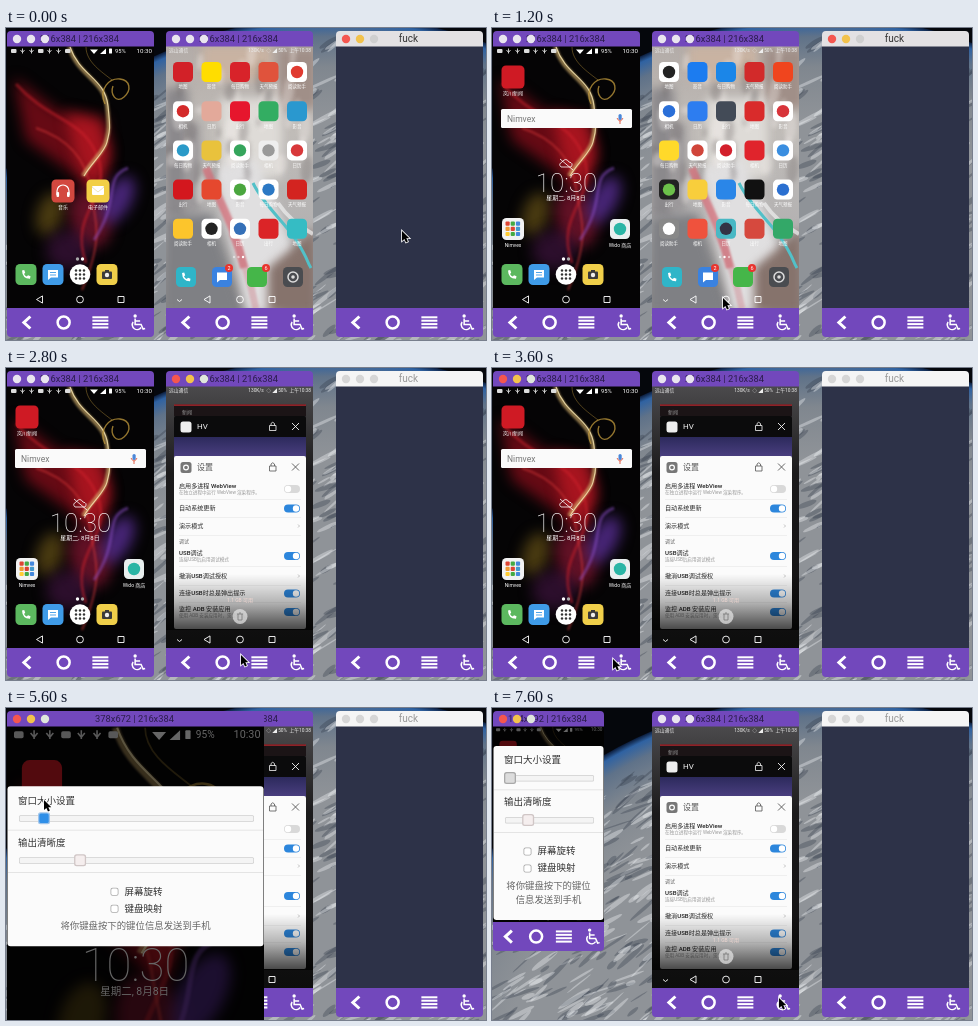
An HTML page with a canvas for the animation above (8000 ms loop, 480 px wide and 312 px high).

```html
<!DOCTYPE html>
<html lang="zh">
<head>
<meta charset="utf-8">
<style>
html, body { margin: 0; width: 100%; height: 100%; overflow: hidden; background: #000; }
canvas { display: block; width: 480px; height: 312px; }
</style>
</head>
<body>
<canvas></canvas>
<script>
const canvas = document.querySelector('canvas'), g = canvas.getContext('2d');
const dpr = window.devicePixelRatio || 1;
canvas.width = 480 * dpr;
canvas.height = 312 * dpr;

const PURPLE = '#7248bc', STEP = 400, STEPS = 20;

// drawing helpers
function rect(x, y, w, h, col, r = 0) {
  g.fillStyle = col;
  g.beginPath();
  g.roundRect(x, y, w, h, r);
  g.fill();
}
function oval(x, y, rx, ry, turn, col) {
  g.fillStyle = col;
  g.beginPath();
  g.ellipse(x, y, rx, ry, turn, 0, 7);
  g.fill();
}
const disc = (x, y, r, col) => oval(x, y, r, r, 0, col);
function ring(x, y, r, col, w) {
  g.strokeStyle = col;
  g.lineWidth = w;
  g.beginPath();
  g.arc(x, y, r, 0, 7);
  g.stroke();
}
function line(d, col, w = 1) {
  g.strokeStyle = col;
  g.lineWidth = w;
  g.stroke(new Path2D(d));
}
function shape(d, col) {
  g.fillStyle = col;
  g.fill(new Path2D(d));
}
function text(s, x, y, size, col, align = 'left', weight = 400) {
  g.font = `${weight} ${size}px Roboto, "Noto Sans CJK SC", "Noto Sans CJK", sans-serif`;
  g.textAlign = align;
  g.textBaseline = 'middle';
  g.fillStyle = col;
  g.fillText(s, x, y);
}
function fade(y0, y1, ...cols) {
  const f = g.createLinearGradient(0, y0, 0, y1);
  cols.forEach((c, i) => f.addColorStop(i / (cols.length - 1), c));
  return f;
}
function at(x, y, draw) {
  g.save();
  g.translate(x, y);
  draw();
  g.restore();
}
function blurred(px, draw) {
  g.save();
  g.filter = `blur(${px * dpr}px)`;
  draw();
  g.restore();
}
function random(seed) {
  return () => (seed = seed * 16807 % 2147483647) / 2147483647;
}

// planet seen from space
function desktop() {
  rect(0, 0, 480, 312, '#05070c');
  g.save();
  const earth = g.createRadialGradient(330, 420, 330, 330, 420, 432);
  [[0, '#8f9398'], [.5, '#80878f'], [.8, '#5f7289'], [.94, '#2f62a2'], [1, '#0a1a38']]
    .forEach(s => earth.addColorStop(...s));
  g.fillStyle = earth;
  g.beginPath();
  g.arc(330, 420, 432, 0, 7);
  g.fill();
  g.clip();
  const rnd = random(11);
  for (let i = 0; i < 900; i++) {
    const x = rnd() * 480, y = rnd() * 320, light = rnd() < .55;
    if (Math.hypot(x - 330, y - 420) > 408) continue;
    oval(x, y, 5 + rnd() * 15, .6 + rnd() * 2.2, rnd() * .5 - .8,
      light ? 'rgba(240,242,244,.38)' : 'rgba(52,60,74,.34)');
  }
  g.restore();
}

const toolIcons = [
  () => line('M3.5-6L-3 0 3.5 6', '#fff', 3),
  () => ring(0, 0, 6, '#fff', 2.5),
  () => [-5.2, -1.8, 1.6, 5].forEach(y => rect(-8, y - 1, 16, 2, '#fff')),
  () => {
    disc(-2, -6.5, 1.7, '#fff');
    line('M-2-4V2H4L6 6.5 8 6M-2-1.5H3', '#fff', 1.5);
    line('M-4-.5A4.6 4.6 0 1 0 4 5', '#fff', 1.5);
  }
];

function chrome(x, w, h, title, active, plain) {
  const idle = plain ? '#d6d6d6' : '#e9e5ef';
  const lights = ['#f4564f', '#f2c24c', plain ? '#cfcfcf' : '#dfe6dc'];
  rect(x, 3, w, 15.5, plain ? (active ? '#e3e1e3' : '#f5f5f5') : PURPLE, [4, 4, 0, 0]);
  text(title, x + w / 2 - 1, 11, plain ? 10 : 9.3, plain ? (active ? '#333' : '#999') : '#2a1c4a', 'center');
  [10, 24, 38].forEach((dx, i) => disc(x + dx, 11, 4.2, active ? lights[i] : idle));
  rect(x, 18 + h, w, 29, PURPLE, [0, 0, 4, 4]);
  toolIcons.forEach((icon, i) => at(x + w / 8 + 1.5 + i * w / 4, 32.5 + h, icon));
}

// phone parts
const words = ['影音', '阅读助手', '出行', '每日购物', '相机', '地图', '天气预报', '日历'];
function icon(x, y, spec, size = 20) {
  const [bg, dot] = spec.split('/');
  rect(x - size / 2, y - size / 2, size, size, '#' + bg, 4.5);
  if (dot) disc(x, y, size * .31, '#' + dot);
}
function grid(list, y0) {
  list.split(' ').forEach((spec, i) => {
    const x = 177 + i % 5 * 28.5, y = y0 + Math.floor(i / 5) * 39.2;
    icon(x, y, spec);
    text(words[(i * 3 + list.length) % 8], x, y + 15, 4.5, '#fff', 'center');
  });
}
function nav(xs) {
  const [a, b, c] = xs;
  at(a, 271.5, () => line('M3-3.6V3.6L-3 0Z', '#fff', .9));
  ring(b, 271.5, 3.4, '#fff', .9);
  at(c, 271.5, () => line('M-3-3H3V3H-3Z', '#fff', .9));
}
const handset = 'M-4-4L-1.8-4.4-.8-1.8-2-.6Q-.8 1.4.8 2L2 .8 4.5 1.8 4 4.2Q-3.6 4.4-4-4Z';
const bubble = 'M-5-4.5H5V3H-2L-5 5.5Z';

function camera(x, y) {
  rect(x - 5, y - 3.5, 10, 7.5, '#3a3a3a', 1);
  rect(x - 2, y - 5, 4, 2, '#3a3a3a');
  disc(x, y, 2.2, '#eee');
}

// left phone
function smoke() {
  rect(1, 18, 147, 263, '#050405');
  blurred(7, () => {
    shape('M8 50L50 82 88 92 104 120 92 170 60 140 20 112Z', 'rgba(120,12,24,.85)');
    shape('M60 85L98 90 104 130 88 165 70 130Z', 'rgba(190,25,35,.75)');
    oval(44, 186, 13, 22, .3, 'rgba(98,78,22,.75)');
    oval(84, 190, 20, 30, -.3, 'rgba(130,22,48,.75)');
    oval(112, 172, 13, 26, .5, 'rgba(84,44,140,.85)');
    oval(62, 222, 22, 20, 0, 'rgba(70,22,70,.6)');
  });
  blurred(1, () => {
    line('M10 56C45 95 78 90 92 130S62 185 80 235', 'rgba(205,35,45,.5)', 3);
    line('M30 100C60 110 80 130 84 160S100 205 76 262', 'rgba(225,60,60,.5)', 2);
    line('M122 140C96 150 116 170 88 212', 'rgba(140,80,200,.5)', 3);
    line('M63 19C72 48 98 52 101 78S102 104 100 114 84 134 77 148', 'rgba(214,178,110,.65)', 4);
  });
  line('M64 19C74 48 99 50 102 78S103 104 101 114 86 134 78 148', 'rgba(246,228,176,.85)', 1.2);
  line('M99 76C92 60 104 50 114 51S126 62 118 69 104 66 107 58', 'rgba(196,156,62,.75)', 1.4);
  line('M80 19C80 34 96 44 106 52', 'rgba(196,156,62,.4)', 1);
}
function homeOne() {
  icon(21, 49, 'cf1a24', 23);
  text('岚川新闻', 21, 66, 5, '#fff', 'center');
  rect(9, 81, 131, 19, '#fafafa', 1.5);
  text('Nimvex', 15, 91, 8.5, '#777');
  rect(126.5, 86, 3.2, 6, '#4a86d8', 1.6);
  line('M125 90Q128 96 131 90M128 93V96', '#e0543c', .9);
  line('M69 139H79Q82 135 77 134 74 129 70 134 66 136 69 139ZM68 131L81 142', '#fff', .8);
  text('10:30', 74.5, 156, 26, '#fff', 'center', 100);
  text('星期二, 8月8日', 74, 170, 6, '#fff', 'center');
  icon(21, 201, 'f2f2f2', 22);
  ['#d43', '#4a4', '#48d', '#e93', '#d43', '#49c', '#fc3', '#4a4', '#48d'].forEach((c, i) =>
    rect(13.5 + i % 3 * 5.2, 193.5 + Math.floor(i / 3) * 5.2, 4.2, 4.2, c, 1));
  text('Nimvex', 21, 218, 5, '#fff', 'center');
  icon(128, 201, 'e9efef/2ab5a5', 20);
  text('Wido 商店', 128, 218, 5, '#fff', 'center');
}
function homeTwo() {
  icon(57, 163, 'd3483f', 23);
  line('M51 167V163A6 6 0 0 1 63 163V167', '#fff', 1.2);
  rect(50.5, 164, 2.6, 5, '#fff', 1);
  rect(61, 164, 2.6, 5, '#fff', 1);
  text('音乐', 57, 180, 5, '#fff', 'center');
  icon(92, 163, 'f2cf45', 23);
  rect(86, 158, 12, 9, '#fff', 1);
  line('M86 159L92 164 98 159', '#e9d9a0', .7);
  text('电子邮件', 92, 180, 5, '#fff', 'center');
}
function leftScreen(p) {
  smoke();
  at(p * 147, 0, homeTwo);
  at((p - 1) * 147, 0, homeOne);
  for (let i = 0; i < 7; i++) {
    if (i % 3 == 0) rect(5 + i * 9, 21, 5.5, 4, '#ddd', 1);
    else at(7.5 + i * 9, 23, () => line('M0-2.5V2.5M-2-1L0 1.5 2-1', '#ddd', .9));
  }
  shape('M84 21.5H92L88 26ZM100 20.5V26H94Z', '#fff');
  rect(103, 20.5, 3, 5, '#fff', .5);
  text('95%', 109, 23.2, 5.8, '#fff');
  text('10:30', 146, 23.2, 6.2, '#fff', 'right');
  disc(71.5, 231, 1.7, p < .5 ? '#aaa' : '#fff');
  disc(76.5, 231, 1.7, p < .5 ? '#fff' : '#aaa');
  icon(20, 246.5, '5cb85f', 21);
  at(20, 246.5, () => shape(handset, '#fff'));
  icon(47, 246.5, '3f9be8', 21);
  at(47, 246.5, () => shape(bubble, '#fff'));
  line('M44 244.5H50M44 247H50', '#3f9be8', .9);
  disc(74, 246.5, 10.3, '#fff');
  for (let i = 0; i < 9; i++) disc(70 + i % 3 * 4, 242.5 + Math.floor(i / 3) * 4, 1.2, '#333');
  icon(101, 246.5, 'f0cf4a', 21);
  camera(101, 247);
  nav([33.5, 74, 115]);
}

// middle phone
const pageA = 'd22128 fd0 d8232a e0533c fff/e03a30 fff/d42a2a e3a99a e6162d 33ad62 2a98cf fff/2a9ac8 e9c23c fff/35a55c eee/999 fff/d8383a ' +
  'd3171e e5482e fff/4aa63e fff/2b78c4 d32420 fcc52c fff/222 fff/3570b8 db2427 35bcc4';
const pageB = 'fff/222 1c7cf0 1b86e8 d22a2a f0451e fff/2a6fd8 2d7df0 434b57 d92b2b fff/d8343a ffd92a fff/d0453a fff/d3202c e0242c fff/3a8ee0 ' +
  '222/6cc04a f8ce3c 2a86e8 111 fff/2a6fd0 888/fff ef523d 48b8c4/334 d6493e 33a868';

function street() {
  rect(160, 18, 148, 263, fade(18, 281, '#b3aca8', '#c0bcb8', '#b4b2b2', '#8d8887'));
  blurred(5, () => {
    rect(158, 60, 24, 130, '#8b898c');
    rect(196, 18, 70, 34, '#c9b3a2');
    rect(272, 20, 40, 60, '#a08f88');
    rect(180, 95, 14, 90, '#9a9799');
    rect(214, 70, 62, 80, '#dedbd7');
    shape('M158 190L205 185 238 285H158Z', '#7f8084');
    shape('M208 140L250 130 296 240 270 285H240Z', '#e0dfe0');
    shape('M262 240L310 200V285H262Z', '#86736c');
  });
  const rnd = random(5);
  blurred(2, () => {
    for (let i = 0; i < 45; i++)
      oval(160 + rnd() * 148, 25 + rnd() * 150, 2 + rnd() * 5, 4 + rnd() * 13, .1,
        rnd() < .5 ? 'rgba(245,242,238,.35)' : 'rgba(105,98,98,.3)');
  });
  blurred(1, () => {
    line('M200 140C212 172 228 195 238 240', 'rgba(212,110,120,.75)', 8);
    line('M226 205C236 228 244 250 250 281', 'rgba(200,120,130,.4)', 7);
  });
  line('M247 155C258 178 280 195 292 215S300 232 305 240', '#52c0c8', 3);
  line('M272 175C282 190 296 200 307 206', 'rgba(240,240,240,.7)', 4);
}
function homeC() {
  text('10:30', 194, 43, 22.5, '#fff', 'center', 100);
  text('8月8日 星期二', 168, 62, 5.5, '#fff');
  shape('M265 48H279Q282 43 277 42 274 35 269 40 263 41 265 48Z', '#fff');
  text('32°', 281, 43, 10.5, '#fff', 'left', 300);
  text('多云 良', 283, 60, 5, '#fff');
  grid('ddd/222 fff/2a7cc0 ddd/222 f2f2f2/4a86c8 d9322c f0b04a 3c86e4 5a4fa8 f4f4f4 df3a34', 84);
  text('8', 291, 86, 11, '#fff', 'center');
  disc(177, 119, 3.4, '#fff');
  rect(171, 123.5, 12, 5, '#fff', 2.5);
  shape('M205.5 128L200 122Q201 117 205.5 120 210 117 211 122Z', '#fff');
  ring(234, 122.5, 5, '#fff', 1.2);
  line('M234 119V123H237', '#fff', 1);
  for (let i = 0; i < 9; i++) rect(255.5 + i % 3 * 5, 116 + Math.floor(i / 3) * 5, 4, 4, i % 2 ? '#d9534a' : '#4c8fd0', 1);
  rect(167, 151, 20, 20, 'rgba(140,140,140,.55)', 4.5);
  line('M170 156H175M172.5 153.5V158.5M179 156H184M170 165H175M179 164H184M179 167H184', '#fff', .9);
  text('计算器', 177, 177, 4.8, '#fff', 'center');
}
function toggle(y, on) {
  rect(278, y - 4, 16, 8, on ? '#2c86dc' : '#d9d9d9', 4);
  disc(on ? 290 : 282, y, 3.2, '#fff');
}
function cardTop(y, name, col, tile) {
  rect(174.5, y - 5, 11, 11, tile, 2.5);
  text(name, 191, y + .5, 8, col);
  line(`M263.5 ${y - 1}h6.5v5h-6.5zM265 ${y - 1}v-2q1.7-2.5 3.5 0v2`, col, .8);
  line(`M286 ${y - 3.5}l7 7m0-7l-7 7`, col, .9);
}
function recents() {
  rect(160, 18, 148, 263, fade(18, 281, '#4b4a4c', '#1b1a1b', '#161516', '#0d0d0d'));
  rect(168, 36.5, 132, 12, '#1b1416', 1);
  rect(168, 36.5, 132, 1.3, '#b5262c');
  text('新闻', 176, 45, 5, '#999');
  rect(168, 48, 132, 40, '#0b0b0c', 2);
  rect(168, 69, 132, 20, fade(69, 89, '#2c2a5c', '#4a3f80'));
  rect(168, 88, 132, 173, '#fbfbfb', 2);
  cardTop(58.5, 'HV', '#f5f5f5', '#eee');
  cardTop(99, '设置', '#555', '#777');
  ring(180, 99.5, 2.4, '#fff', 1.2);
  const rows = [
    [118, '启用多进程 WebView', 121, 0, '在独立进程中运行 WebView 渲染程序。'],
    [140.5, '自动系统更新', 140.5, 1],
    [158, '演示模式'],
    [185, 'USB调试', 188, 1, '连接USB后启用调试模式'],
    [208, '撤消USB调试授权'],
    [225.5, '连接USB时总是弹出提示', 225.5, 1],
    [241, '监控 ADB 安装应用', 244, 1, '使用 ADB 安装应用时，需要确认']
  ];
  rows.forEach(([y, name, ty, on, sub]) => {
    text(name, 173, y, 6.1, '#222', 'left', 500);
    if (sub) text(sub, 173, y + 7, 4.6, '#999');
    if (ty) toggle(ty, on);
    else line(`M292 ${y - 1.5}l1.5 1.5-1.5 1.5`, '#aaa', .7);
  });
  text('调试', 173, 173.5, 5, '#666');
  [131, 149.5, 167, 198, 217, 234].forEach(y => rect(173, y, 122, .4, '#e4e4e4'));
  rect(160, 206, 148, 56, fade(206, 262, 'rgba(0,0,0,0)', 'rgba(0,0,0,.28)', 'rgba(0,0,0,.72)'));
  text('1.1 GB 可用', 234, 233, 5, '#f0d6d0', 'center');
  disc(234, 248.5, 7.5, 'rgba(225,225,225,.75)');
  line('M231 246H237M232 246V252H236V246M233 245H235', '#777', .8);
}
function middleScreen(p, k) {
  if (k >= 6) recents();
  else {
    street();
    if (k >= 4) homeC();
    else {
      at(p * 147, 0, () => grid(pageA, 44));
      at((p - 1) * 147, 0, () => grid(pageB, 44));
    }
    const on = k >= 4 ? 0 : p < .5 ? 2 : 1;
    [0, 1, 2].forEach(i => disc(228 + i * 4.5, 229, 1.2, i == on ? '#fff' : 'rgba(255,255,255,.5)'));
    icon(180, 249, '2fb5c8', 20);
    at(180, 249, () => shape(handset, '#fff'));
    icon(216, 249, '3a82e0', 20);
    at(216, 249, () => shape(bubble, '#fff'));
    icon(251, 249, '45b649', 20);
    icon(287, 249, '4a4c50', 20);
    ring(287, 249, 5, '#ddd', 1.5);
    disc(287, 249, 1.8, '#ddd');
    [[223, '2'], [260, '6']].forEach(([x, n]) => {
      disc(x, 240, 4, '#e8342e');
      text(n, x, 240.3, 5.5, '#fff', 'center');
    });
  }
  text('远山通信', 163, 23, 4.8, '#eee');
  text('130K/s  ◇ ◢ 50%  上午10:38', 305, 23, 4.8, '#eee', 'right');
  line('M171 271.5l2.5 2 2.5-2', '#fff', .9);
  nav([201, 234, 266]);
}

// settings dialog
function slider(x, y, w, knob, edge, face) {
  rect(x, y - 3, w, 6.5, '#cfcfcf', 1.5);
  rect(x + .7, y - 2.3, w - 1.4, 5.1, '#f4f4f4', 1);
  rect(knob - 6, y - 6, 12, 12, edge, 2.5);
  rect(knob - 4.7, y - 4.7, 9.4, 9.4, face, 1.5);
}
function dialog(w, knob, held) {
  const top = 38 + (w - 111) * .276, x = 13, cx = 1 + w / 2, track = w - 22;
  const note = '将你键盘按下的键位信息发送到手机', n = Math.floor((w - 20) / 9.4);
  rect(1.5, top, w - 1, n < note.length ? 174 : 160, '#fbfbfb', 3);
  at(0, top, () => {
    text('窗口大小设置', 12, 14.5, 9.5, '#333');
    slider(x, 32, track, knob, ...(held ? ['#9fc4ea', '#2f8fe8'] : ['#a9a9a9', '#dcdcdc']));
    rect(2, 43.5, w - 2, .7, '#ddd');
    text('输出清晰度', 12, 56.5, 9.5, '#333');
    slider(x, 74, track, x + track * .26, '#d0c6c6', '#f5eeee');
    rect(2, 86, w - 2, .7, '#ddd');
    ['屏幕旋转', '键盘映射'].forEach((s, i) => {
      const y = 105.5 + i * 17;
      rect(cx - 25, y - 4, 8, 8, '#aaa', 2);
      rect(cx - 24.2, y - 3.2, 6.4, 6.4, '#fff', 1.5);
      text(s, cx - 11, y, 9.5, '#333');
    });
    text(note.slice(0, n), cx, 140, 9.4, '#666', 'center');
    text(note.slice(n), cx, 154, 9.4, '#666', 'center');
  });
}

function screen(x, w, h, draw) {
  g.save();
  g.beginPath();
  g.rect(x, 18, w, h);
  g.clip();
  g.translate(x, 18);
  g.scale(w / 147, w / 147);
  g.translate(-x, -18);
  draw();
  g.restore();
}

// pointer tip for every step
const pointer = [
  [396, 203], [430, 204], [330, 240], [231, 270], [233, 271], [262, 275], [258, 280], [235, 287], [180, 291], [121, 291],
  [127, 291], [70, 170], [33, 79], [38, 80], [38, 92], [34, 102], [29, 103], [18, 78], [120, 190], [287, 290]
];

function render(k) {
  g.setTransform(dpr, 0, 0, dpr, 0, 0);
  const p = 1 - Math.max(0, 1 - k / 2) ** 2;
  const focus = k < 4 ? 2 : k < 9 ? 1 : 0;
  // the slider sets the device width, and the window follows on release
  const knob = k < 11 ? 30 : k < 13 ? 33 : k < 17 ? 38 : 18;
  const size = k < 13 ? 216 : k < 17 ? 378 : 164;
  const w = Math.round(size * .679), h = 262 + (w - 147) * 1.83;
  desktop();

  screen(160, 147, 262, () => middleScreen(p, k));
  chrome(160, 147, 262, '216x384 | 216x384', focus == 1);

  rect(330, 18, 147, 263, '#2d3248');
  chrome(330, 147, 262, 'fuck', focus == 2, true);

  screen(1, w, h, () => leftScreen(p));
  if (k >= 10) rect(1, 18, w, h, 'rgba(0,0,0,.6)');
  chrome(1, w, h, `${size}x${Math.round(size * 16 / 9)} | 216x384`, focus == 0);
  if (k >= 10) dialog(w, knob, k >= 12 && k < 17);

  const [x, y] = pointer[k];
  if ([4, 5, 10, 16].includes(k)) {
    ring(x + 1, y + 1, 13, 'rgba(255,255,255,.55)', 4);
    ring(x + 1, y + 1, 13.5, '#111', 2);
  }
  at(x, y, () => {
    const arrow = 'M0 0V10L2.4 7.9 4 11.5 5.9 10.6 4.3 7.2H7.3Z';
    line(arrow, '#fff', 1.6);
    shape(arrow, '#000');
  });
}

let shown = -1;
const start = performance.now();
function tick() {
  const k = Math.floor((performance.now() - start) / STEP) % STEPS;
  if (k !== shown) render(shown = k);
  requestAnimationFrame(tick);
}
tick();
</script>
</body>
</html>
```
